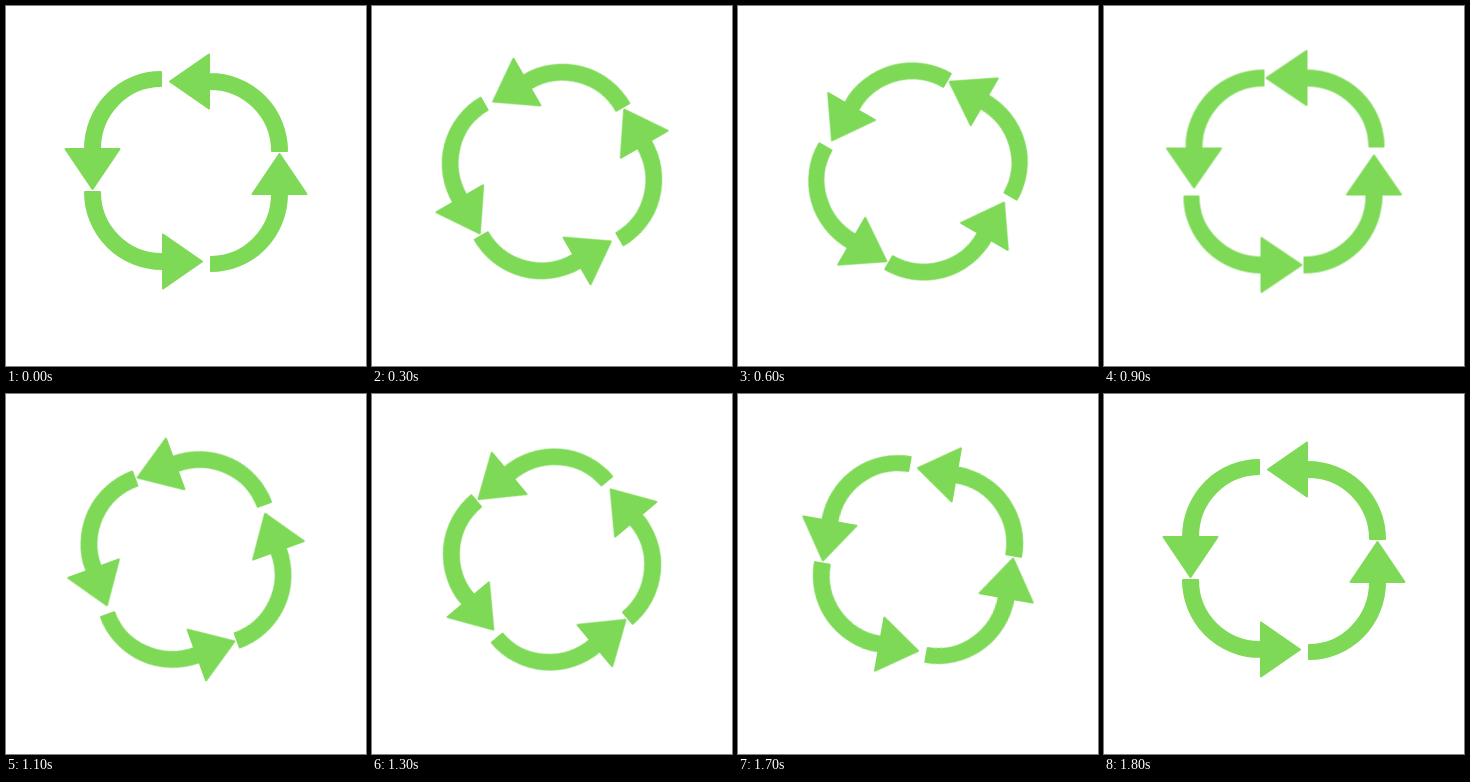
Write an HTML page without scripts that moves like this. It is 360x360 px and loops after 1910 ms.

```html
<!DOCTYPE html>
<html lang="en">
<head>
<meta charset="utf-8">
<title>Turning arrows</title>
<style>
  html, body { margin: 0; height: 100%; overflow: hidden; background: #fff; }
  svg { display: block; width: 100%; height: 100%; }
  .ring {
    fill: #7ed957;
    stroke: #7ed957;
    stroke-width: 2;
    stroke-linejoin: round;
    transform-origin: 180px 165.5px;
    animation: turn 1910ms infinite;
  }
  /* 18 turns of 10 degrees, 100 ms apart, then a short hold */
  @keyframes turn {
    0% { transform: rotate(0deg); animation-timing-function: steps(18, end); }
    94.24%, 100% { transform: rotate(-180deg); }
  }
</style>
</head>
<body>
<svg viewBox="0 0 360 360">
  <g class="ring">
    <g id="pair">
      <path d="M164 75.5 L203 48.5 V68 H204 A77 77 0 0 1 281 145 H266 A62 62 0 0 0 204 83 H203 V102.5 Z"/>
      <path d="M273.5 148 L300.5 188 H281 A76 77 0 0 1 205 265 V251 A61 63 0 0 0 266 188 H246.5 Z"/>
    </g>
    <use href="#pair" transform="rotate(180 180 165.5)"/>
  </g>
</svg>
</body>
</html>
```
